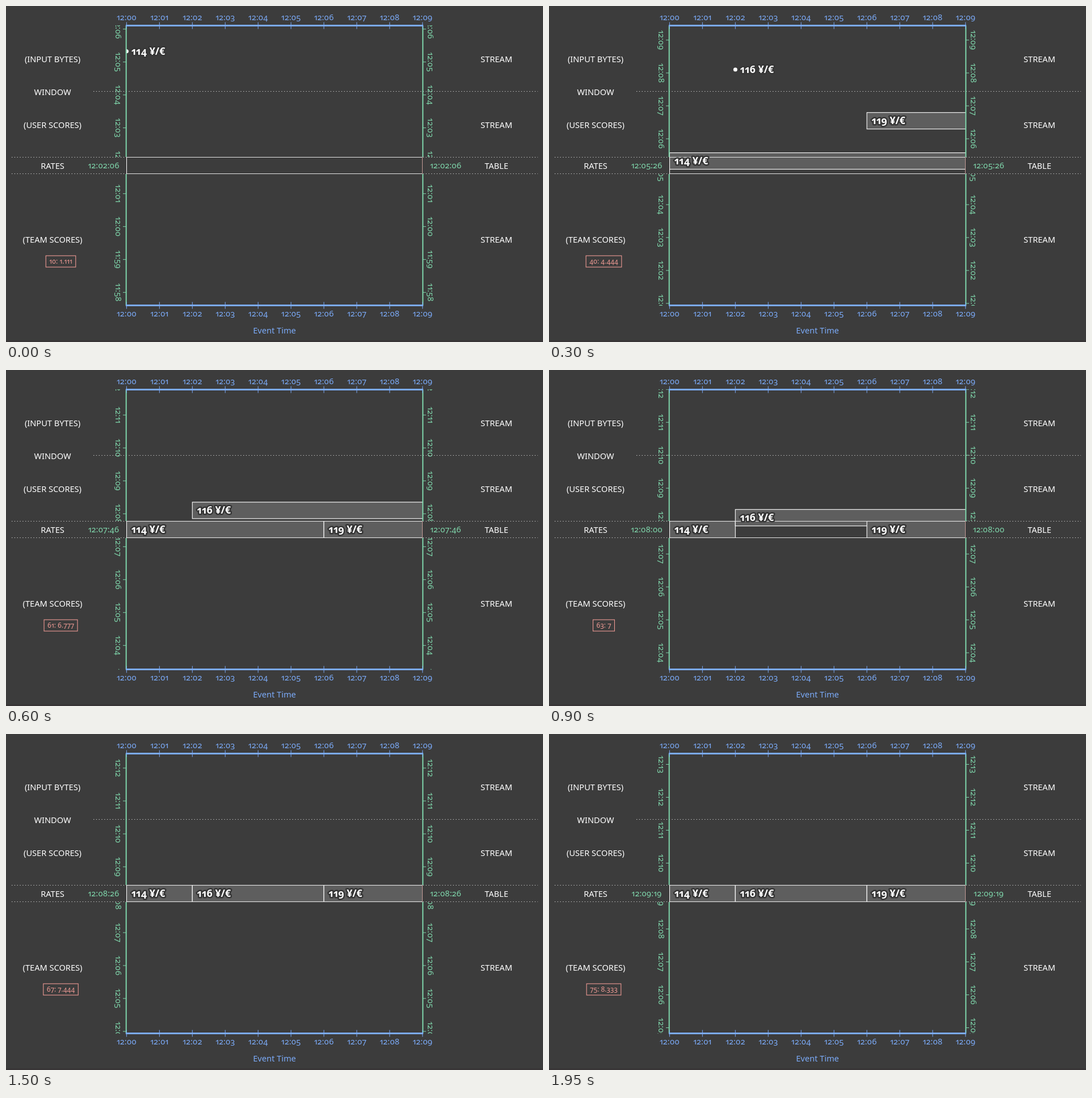
Write an HTML page that moves like this. It is 946x592 px and loops after 2.1 s.

```html
<!DOCTYPE html>
<html lang="en">
<head>
<meta charset="utf-8">
<title>Rates by event time</title>
<style>
  html, body { margin: 0; width: 100%; height: 100%; overflow: hidden; background: #3c3c3c; }
  svg { display: block; }
  text {
    font-family: "Noto Sans", "Open Sans", sans-serif;
    font-size: 14.6px;
    text-anchor: middle;
    font-feature-settings: "onum", "pnum";
  }
  .white { fill: #fff; }
  .blue { fill: #7baaf7; }
  .green { fill: #7fd6ab; }
  .time { font-size: 14.6px; }
  .count { font-size: 12px; fill: #ef9a94; }
  .rate {
    font-size: 17.7px; font-weight: 800; text-anchor: start; fill: #fff;
    stroke: #363636; stroke-width: 5px; stroke-linejoin: round; paint-order: stroke;
  }
  .dots { stroke: #d0d0d0; stroke-width: 1.2; stroke-dasharray: 1.3 3.5; }
</style>
</head>
<body>
<svg width="946" height="592" viewBox="0 0 946 592">
  <defs>
    <clipPath id="scale"><path d="M0 34H946V266H0ZM0 296H946V528H0Z"/></clipPath>
    <clipPath id="plot"><path d="M212 34H734V528H212Z"/></clipPath>
  </defs>
  <rect width="946" height="592" fill="#3c3c3c"/>
  <rect y="589" width="946" height="3" fill="#383536"/>
  <g id="ticks" clip-path="url(#scale)"></g>
  <g id="windows" clip-path="url(#plot)"></g>
  <g id="frame"></g>
  <g id="rates" clip-path="url(#plot)"></g>
  <g id="readout"></g>
</svg>
<script>
const LEFT = 212.4, RIGHT = 733.8, TOP = 34.5, BOTTOM = 527.5;
const TABLE_TOP = 266.5, TABLE_BOTTOM = 295.5, WINDOW_Y = 150.5;
const MINUTE_W = (RIGHT - LEFT) / 9, MINUTE_H = 58, STEPS_PER_MINUTE = 9;
const STEP_MS = 150;
const STEPS = [10, 26, 40, 60, 61, 62, 63, 64, 65, 66, 67, 68, 73, 75];

// Event minute, rate, and the step at which the event is at ENTRY_Y.
const ENTRY_Y = 112, REST_Y = 281, HALF = 14.5;
const EVENTS = [
  { minute: 0, rate: 114, entry: 15 },
  { minute: 2, rate: 116, entry: 40 },
  { minute: 6, rate: 119, entry: 26 }
];

const el = id => document.getElementById(id);
const pad = n => String(n).padStart(2, "0");
const minuteX = m => LEFT + m * MINUTE_W;
const clock = m => m < 0 ? `11:${60 + m}` : `12:${pad(m)}`;
const text = (x, y, str, cls, extra = "") =>
  `<text x="${x}" y="${y}" class="${cls}" ${extra}>${str}</text>`;
const line = (x1, y1, x2, y2, attrs) =>
  `<path d="M${x1} ${y1}L${x2} ${y2}" fill="none" ${attrs}/>`;
const stroke = (color, width) => `stroke="${color}" stroke-width="${width}"`;

function drawFrame() {
  const blue = "#7baaf7", green = "#7fd6ab";
  let out = "";
  for (const [x1, y] of [[154, WINDOW_Y], [10, TABLE_TOP], [10, TABLE_BOTTOM]])
    out += line(x1, y, 937, y, 'class="dots"');
  for (const y of [TABLE_TOP, TABLE_BOTTOM])
    out += line(LEFT, y, RIGHT, y, stroke("#e4e4e4", 1));
  out += line(212.5, TABLE_TOP, 212.5, TABLE_BOTTOM, stroke("#fff", 1));
  out += line(733.5, TABLE_TOP, 733.5, TABLE_BOTTOM, stroke("#c39a97", 1));
  for (const x of [LEFT - .7, RIGHT + .5]) {
    out += line(x, TOP, x, 266, stroke(green, 2));
    out += line(x, 296, x, BOTTOM, stroke(green, 2));
  }
  for (const [y, labelY] of [[TOP, 25], [BOTTOM, 546.5]]) {
    out += line(LEFT - 1.4, y, RIGHT + 1.2, y, stroke(blue, 3));
    for (let m = 0; m < 10; m++) {
      out += line(minuteX(m), y - 6, minuteX(m), y + 6, stroke(blue, 1));
      out += text(minuteX(m), labelY, clock(m), "blue time");
    }
  }
  out += text(473, 577, "Event Time", "blue");
  const rows = [
    [98.5, "(INPUT BYTES)", "STREAM"],
    [156.5, "WINDOW", ""],
    [214.5, "(USER SCORES)", "STREAM"],
    [286.5, "RATES", "TABLE"],
    [417, "(TEAM SCORES)", "STREAM"]
  ];
  for (const [y, name, kind] of rows)
    out += text(82, y, name, "white") + text(864, y, kind, "white");
  el("frame").innerHTML = out;
}

function drawTicks(step) {
  const now = 1 + step / STEPS_PER_MINUTE;
  let out = "";
  for (let m = Math.floor(now) - 5; m < now + 5; m++) {
    const y = 266.2 - (m - now) * MINUTE_H;
    for (const [x, tick] of [[198, 206], [748, 734]]) {
      out += line(tick, y, tick + 6, y, stroke("#7fd6ab", 1));
      out += text(0, 5, clock(m), "green time", `transform="translate(${x} ${y}) rotate(90)"`);
    }
  }
  el("ticks").innerHTML = out;
}

function drawEvents(step) {
  const placed = EVENTS.map(e => ({
    ...e,
    x: minuteX(e.minute),
    y: Math.min(REST_Y, ENTRY_Y + (step - e.entry) * MINUTE_H / STEPS_PER_MINUTE)
  }));
  let windows = "", rates = "";
  placed.forEach((e, i) => {
    if (e.y < TOP - HALF) return;
    if (e.y < WINDOW_Y) {
      windows += `<circle cx="${e.x}" cy="${e.y}" r="3.5" fill="#fff"/>`;
    } else {
      // A window at rest is cut short by a later one that has reached the table.
      const next = e.y === REST_Y && placed.slice(i + 1).find(o => o.y + HALF > TABLE_TOP);
      const end = next ? next.x : RIGHT + 1;
      windows += `<rect x="${e.x}" y="${e.y - HALF}" width="${end - e.x}" height="${2 * HALF}" ` +
        `fill="#5e5e5e" ${stroke("#fff", 1.1)}/>`;
    }
    rates += text(e.x + 8.5, e.y + 6, `${e.rate} ¥/€`, "rate");
  });
  el("windows").innerHTML = windows;
  el("rates").innerHTML = rates;
}

function drawReadout(step) {
  const value = Math.floor(step / STEPS_PER_MINUTE * 1000) / 1000;
  const secs = Math.floor(60 + 60 * value);
  const stamp = `12:${pad(Math.floor(secs / 60))}:${pad(secs % 60)}`;
  const box = el("readout");
  box.innerHTML = text(172, 286, stamp, "green time") + text(774.5, 286, stamp, "green time") +
    text(96.5, 454, `${step}: ${value}`, "count");
  const width = box.lastChild.getComputedTextLength() + 12;
  box.insertAdjacentHTML("beforeend",
    `<rect x="${96.5 - width / 2}" y="440" width="${width}" height="20" fill="none" ${stroke("#ef9a94", 1.1)}/>`);
}

let shown;
function render(ms) {
  const step = STEPS[Math.floor(ms / STEP_MS) % STEPS.length];
  if (step === shown) return;
  shown = step;
  drawTicks(step);
  drawEvents(step);
  drawReadout(step);
}

drawFrame();
const start = performance.now();
function loop() {
  render(performance.now() - start);
  requestAnimationFrame(loop);
}
loop();
</script>
</body>
</html>
```
